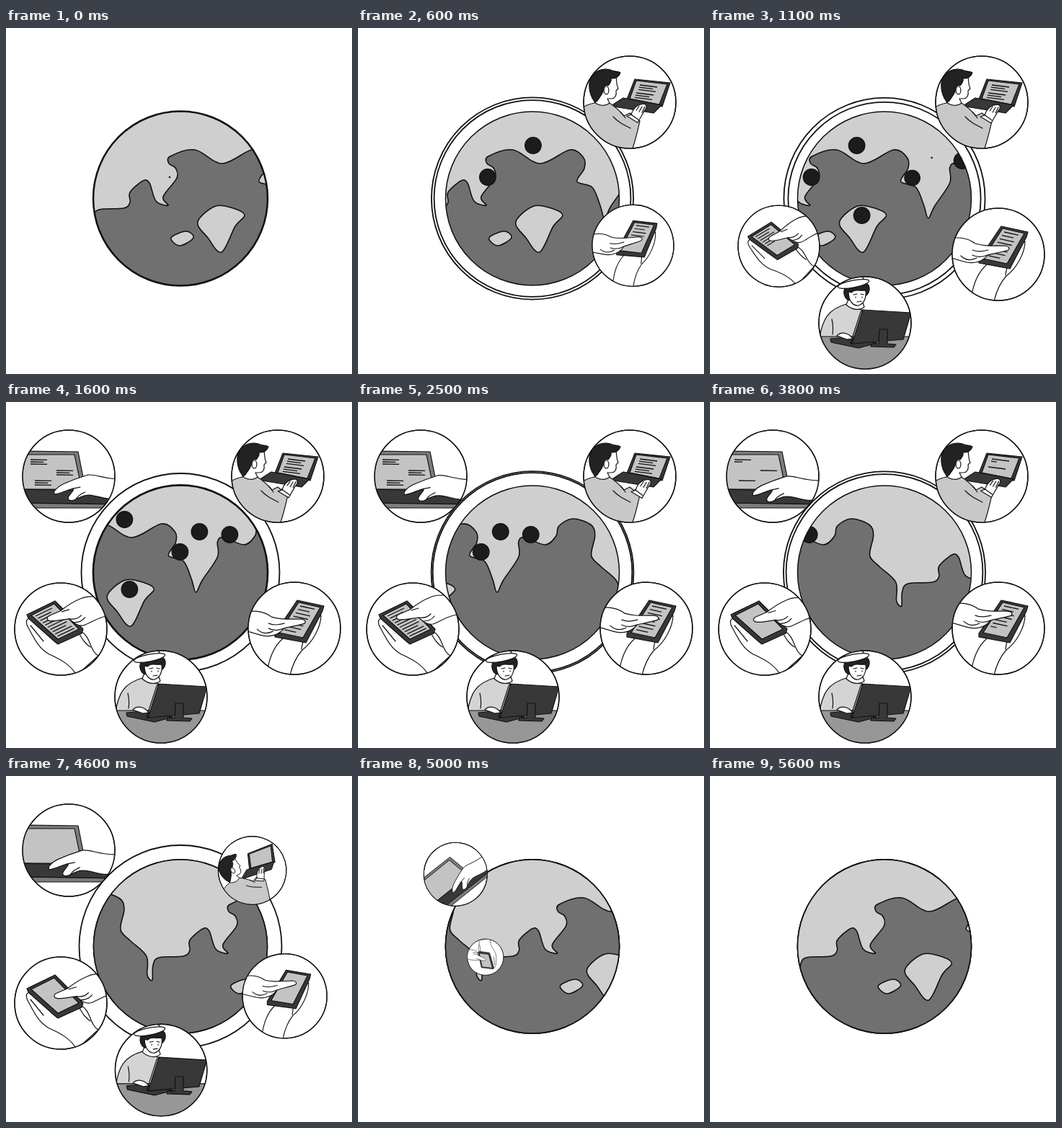
Recreate the animation shown at these times as an HTML page. Size 480x480 px, loop 5.7 s.

```html
<!DOCTYPE html>
<html lang="en">
<head>
<meta charset="utf-8">
<title>Connected globe</title>
<style>
  html, body { margin: 0; width: 100%; height: 100%; overflow: hidden; background: #fff; }
  svg { display: block; width: 100vw; height: 100vh; }
  path, ellipse, circle { stroke: #111; stroke-width: 1.2; stroke-linejoin: round; }
  .white { fill: #fff; }
  .cloth { fill: #c8c8c8; }
  .shirt { fill: #d4d4d4; }
  .screen { fill: #c3c3c3; }
  .bezel { fill: #7c7c7c; }
  .table { fill: #979797; }
  .dark { fill: #383838; }
  .hair { fill: #222; }
  .line { fill: none; stroke-linecap: round; }
  .text path { fill: none; stroke-width: 1.3; }
  .edge { fill: none; stroke-width: 1.5; }
  .ring { fill: #fff; stroke-width: 1.8; }
  #map path { fill: #cfcfcf; stroke-width: 1.6; }
  #dots circle { fill: #1c1c1c; }
</style>
</head>
<body>
<svg viewBox="0 0 480 480">
  <defs>
    <clipPath id="globeClip"><circle cx="242" cy="236.5" r="120.3"/></clipPath>
    <clipPath id="bubbleClip"><circle r="64"/></clipPath>
  </defs>

  <circle class="ring" id="outer" cx="242" cy="236.5"/>
  <circle class="ring" id="inner" cx="242" cy="236.5"/>
  <g clip-path="url(#globeClip)">
    <circle cx="242" cy="236.5" r="121" fill="#707070"/>
    <g id="map"><g id="dots"></g></g>
  </g>
  <circle class="edge" cx="242" cy="236.5" r="120.5"/>

  <g id="man">
    <path class="dark" d="M384 71L433 76 422 109 373 99Z"/>
    <path class="screen" d="M386 73L429 78 418 106 377 98Z"/>
    <g class="text"></g>
    <path class="dark" d="M354 106L368 97 421 107 410 118 355 109Z"/>
    <path class="cloth" d="M312 110C320 105 333 102 347 103C356 108 363 115 369 122L377 118 391 129C388 142 386 152 380 170H312Z"/>
    <path class="line" d="M354 123C360 130 368 134 378 139M365 117L371 125"/>
    <g class="move">
      <path class="white" d="M381 121C384 111 391 106 400 106C404 109 402 113 399 116C396 122 393 126 390 132L375 123Z"/>
      <path class="line" d="M392 109L388 115M396 110L392 117M400 110L396 118M380 120L391 128"/>
    </g>
    <path class="white" d="M344 70L358 67C359 74 358 78 361 84L358 87C359 93 357 98 351 98H346L349 104C343 109 334 108 328 103L332 88Z"/>
    <path class="hair" d="M329 103C322 95 319 82 322 71C328 59 340 55 350 58C355 61 360 59 364 62C362 68 357 70 351 70C352 75 349 77 347 80C343 78 340 82 340 88C338 93 335 96 332 101Z"/>
    <ellipse class="white" cx="344.500" cy="86.500" rx="3.400" ry="5.500"/>
  </g>

  <g id="phoneR">
    <path class="white" d="M437 296C437 312 425 334 411 344C404 352 398 362 394 379L362 374C366 354 371 340 384 328Z"/>
    <path class="line" d="M428 308C418 318 411 331 410 343"/>
    <path class="dark" d="M404 275L441 283 439 290 416 334 373 326V321Z"/>
    <path class="screen" d="M406 278L436 285 412 327 379 320Z"/>
    <g class="text"></g>
    <g class="move">
      <path class="white" d="M330 288C342 283 358 284 370 293C382 297 394 296 411 296C418 297 419 302 413 303C402 306 394 307 387 309C382 316 370 323 354 318L330 311Z"/>
      <path class="line" d="M366 302C374 305 380 304 388 302M366 309C372 312 380 312 387 309M350 310C356 316 364 317 372 313"/>
    </g>
  </g>

  <g id="desk">
    <path class="shirt" d="M152 430C156 404 164 390 189 383C200 392 212 388 225 397V432H152Z"/>
    <path class="line" d="M169 404C171 412 171 418 170 425"/>
    <path class="white" d="M192 376L189 384C198 392 208 392 214 387L211 378Z"/>
    <path class="hair" d="M187 361C184 368 187 376 193 378L197 367 217 371C223 365 222 357 217 354Z"/>
    <path class="white" d="M192 366C192 379 199 386 206 385C214 382 217 374 216 364C207 365 201 362 196 367Z"/>
    <path class="line" d="M199 370L204 369M209 369L213 370M202 373V374M211 373V374M204 380L210 379"/>
    <path class="white" d="M185 356C187 346 199 341 212 346L215 353Z"/>
    <ellipse class="white" cx="199" cy="355" rx="22" ry="5" transform="rotate(-11 199 355)"/>
    <path class="table" d="M145 428H285V478H145Z"/>
    <path class="dark" d="M167 431L190 429 232 437 206 444 168 436Z"/>
    <path class="white" d="M176 427C181 421 192 422 198 431L190 432Z"/>
    <path class="dark" d="M212 391L279 395 268 432 197 438Z"/>
    <path class="line" d="M212 391L209 394 195 437 197 438"/>
    <path class="dark" d="M235 418H246V438L258 439 255 443 223 442 224 438H234Z"/>
  </g>

  <g id="phoneL">
    <path class="white" d="M33 300C27 301 27 307 32 315C40 330 46 342 60 350C76 357 90 365 98 379L128 352C116 345 118 326 104 318Z"/>
    <path class="line" d="M102 322C107 331 110 335 117 340M34 310L52 332"/>
    <path class="dark" d="M29 295L68 276 107 315 105 321 72 336 67 332 31 300Z"/>
    <path class="screen" d="M35 296L67 280 101 315 72 329Z"/>
    <g class="text"></g>
    <g class="move">
      <path class="white" d="M150 272C128 273 118 270 108 275C98 279 90 284 80 292L66 298C60 300 60 305 66 306C76 306 84 304 92 303C98 308 104 314 112 312C124 308 132 300 150 298Z"/>
      <path class="line" d="M92 303C98 304 104 303 109 298M82 293L92 290M99 308C106 308 111 305 114 301"/>
    </g>
  </g>

  <g id="laptop">
    <path class="bezel" d="M18 68L100 69 111 124H18Z"/>
    <path class="screen" d="M18 73L95 73 105 121H18Z"/>
    <g class="text"></g>
    <path class="bezel" d="M18 139L154 141V147L18 147Z"/>
    <path class="dark" d="M18 121L111 123 154 132V142L18 140Z"/>
    <g class="move">
      <path class="white" d="M158 108C135 109 122 101 110 102C97 106 84 111 75 115C67 119 60 126 64 129C72 128 78 124 89 121C92 122 86 127 83 132C80 138 87 139 93 136C104 130 110 129 118 131C130 133 140 138 158 134Z"/>
      <path class="line" d="M89 121L99 119M93 136C96 131 101 128 106 126"/>
    </g>
  </g>
</svg>

<script>
const LOOP = 5700, STEP = 100, SPEED = 0.0785, WIDTH = 444, RADIUS = 120.5;
const HUB = [242, 210];
const NS = "http://www.w3.org/2000/svg";
const $ = id => document.getElementById(id);
const clamp = x => Math.min(1, Math.max(0, x));
const lerp = (a, b, p) => a + (b - a) * p;
const easeIn = p => p * p;
const easeOut = p => 1 - (1 - p) ** 2;
const span = (t, start, length) => clamp((t - start) / length);
const wave = (t, period) => Math.cos(2 * Math.PI * t / period);

function add(parent, tag, attrs) {
  const node = document.createElementNS(NS, tag);
  for (const key in attrs) node.setAttribute(key, attrs[key]);
  return parent.appendChild(node);
}

const points = text => text.trim().split(/\s+/).map(p => p.split(",").map(Number));
const shifted = (pts, dx) => pts.map(([x, y]) => [x + dx, y]);

// Closed Catmull-Rom curve through the points.
function smooth(pts) {
  const n = pts.length, at = i => pts[(i + n) % n];
  let d = "M" + pts[0];
  for (let i = 0; i < n; i++) {
    const [a, b, c, e] = [-1, 0, 1, 2].map(k => at(i + k));
    const out = [0, 1].map(k => b[k] + (c[k] - a[k]) / 6);
    const back = [0, 1].map(k => c[k] - (e[k] - b[k]) / 6);
    d += `C${out} ${back} ${c}`;
  }
  return d;
}

const coast = points(`121,263 129,252 163,250 172,242 172,228 190,212 199,215 208,240
  225,246 218,234 237,208 235,194 226,188 228,178 262,169 300,188 341,169 360,180
  361,195 351,213 372,221 383,246 389,264 398,247 419,215 419,194 427,188 456,198
  471,186 475,172 494,162 519,170 525,185 520,213 533,228 556,250 557,276 564,283`);
const islands = [
  "266,269 291,247 318,251 331,260 318,275 299,311 280,291",
  "229,291 250,282 260,291 241,302"
].map(points);

const map = $("map"), dotLayer = $("dots");
const addLand = pts => map.insertBefore(add(map, "path", { d: smooth(pts) }), dotLayer);
const copies = [-1, 0, 1].map(k => k * WIDTH);
addLand([...copies.flatMap(dx => shifted(coast, dx)), [1100, 0], [-400, 0]]);
for (const dx of copies)
  for (const isle of islands) addLand(shifted(isle, dx));

// In order of appearance.
const dots = points("227,207 290,163 436,184 297,260 367,208 394,180")
  .map(([cx, cy]) => add(dotLayer, "circle", { cx, cy }));

// Clockwise from the top right; a screen has rows of text that are typed and later cleared.
const bubbles = [
  { id: "man", home: [377, 103], reach: [4, 1.5], peak: 2500, clear: 3200,
    blocks: [[391, 79], [386, 90]], rows: 3, step: [-1, 3.2], size: [24, 3] },
  { id: "phoneR", home: [400, 314], reach: [-2, 6], peak: 1100, clear: 3600,
    blocks: [[408, 283]], rows: 8, step: [-3.1, 4.7], size: [20, 4.4] },
  { id: "desk", home: [215, 409] },
  { id: "phoneL", home: [76, 315], reach: [-8, -4], peak: 2500, clear: 2700,
    blocks: [[41, 297]], rows: 10, step: [3.4, 3.1], size: [23, -11] },
  { id: "laptop", home: [87, 103], reach: [-4, 1], peak: 4200, clear: 3200,
    blocks: [[34, 80], [70, 95], [40, 109]], rows: 3, step: [0, 3], size: [23, .4] }
];

bubbles.forEach((b, i) => {
  b.start = 100 + 250 * i;
  b.end = 4380 + 95 * i;
  b.node = $(b.id);
  b.hand = b.node.querySelector(".move");
  b.lines = [];
  const text = b.node.querySelector(".text");
  for (let r = 0; r < (b.rows || 0); r++)
    for (const [x, y] of b.blocks) {
      const [w, h] = b.size.map(v => v * (r % 3 === 1 ? .8 : 1));
      const d = `M${x + r * b.step[0]} ${y + r * b.step[1]}l${w} ${h}`;
      b.lines.push(add(text, "path", { d, pathLength: 1 }));
    }
  // Recentre the drawing so it can scale and turn about its middle.
  const art = document.createElementNS(NS, "g");
  art.setAttribute("transform", `translate(${b.home.map(v => -v)})`);
  art.append(...b.node.childNodes);
  add(b.node, "circle", { r: 64, class: "white" });
  add(b.node, "g", { "clip-path": "url(#bubbleClip)" }).append(art);
  add(b.node, "circle", { r: 64, class: "edge" });
});

function drawBubble(b, t) {
  const s = easeOut(span(t, b.start, 380)) * (1 - easeIn(span(t, b.end, 430)));
  const [x, y] = b.home.map((v, k) => lerp(HUB[k], v, s));
  b.node.style.display = s > 0 ? "" : "none";
  b.node.setAttribute("transform", `translate(${x} ${y}) rotate(${-400 * (1 - s) ** 2}) scale(${s})`);
  if (!b.hand) return;
  const swing = wave(t - b.peak, LOOP);
  b.hand.setAttribute("transform", `translate(${b.reach.map(v => v * swing)})`);
  const typed = span(t, b.start, 450) * (1 - span(t, b.clear, 1000)) * b.lines.length;
  b.lines.forEach((line, i) => line.setAttribute("stroke-dasharray", `${clamp(typed - i)} 2`));
}

// The outer ring stays open and breathes a little; the inner one pulses out from the globe.
function drawRings(t) {
  const open = easeOut(span(t, -10, 410)) * (1 - easeIn(span(t, 4610, 190)));
  const pulse = (1 - wave(t, 1600)) / 2, live = 1 - span(t, 4000, 500);
  $("outer").setAttribute("r", RADIUS + open * (20 - 3 * live * (1 - pulse)));
  $("inner").setAttribute("r", RADIUS + open * (1 + 17.5 * pulse) * live);
}

function draw(t) {
  map.setAttribute("transform", `translate(${-SPEED * t} 0)`);
  dots.forEach((dot, i) => dot.setAttribute("r", 11.3 * easeOut(span(t, 220 * i - 10, 300))));
  drawRings(t);
  for (const b of bubbles) drawBubble(b, t);
}

function tick() {
  const t = performance.now() % LOOP;
  draw(Math.floor(t / STEP) * STEP);
  requestAnimationFrame(tick);
}
tick();
</script>
</body>
</html>
```
